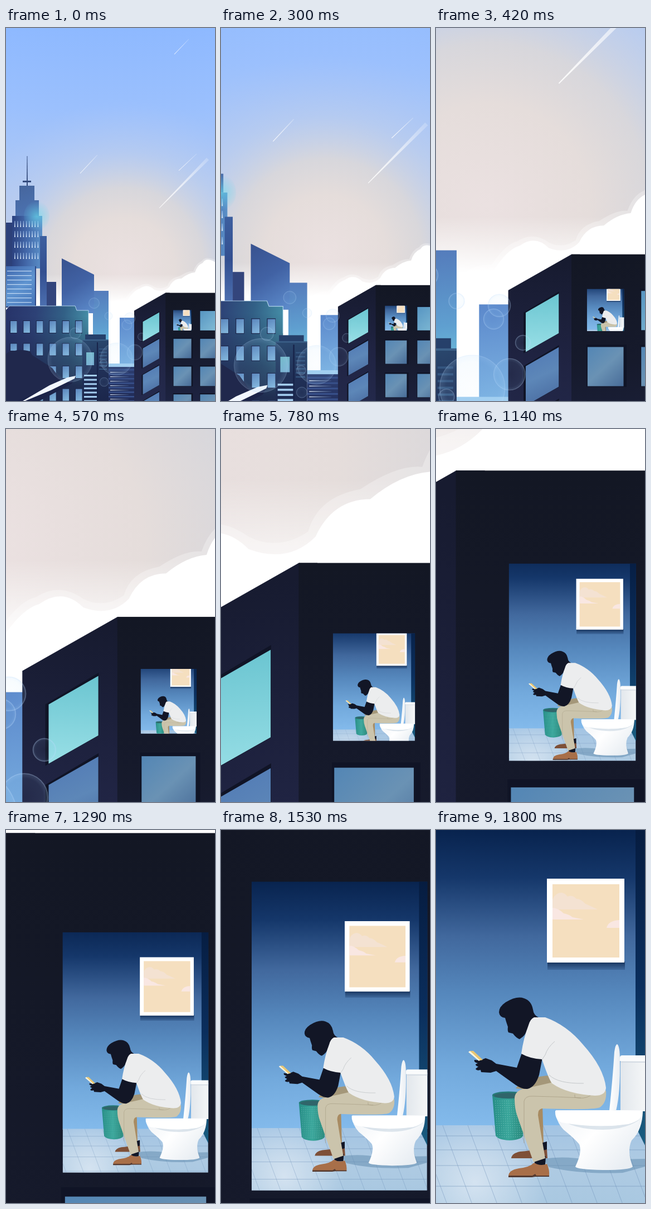
Recreate the animation shown at these times as an HTML page with a canvas. Size 375x667 px, loop 1.83 s.

```html
<!DOCTYPE html>
<html lang="en">
<head>
<meta charset="utf-8">
<title>City zoom</title>
<style>
html, body { margin: 0; width: 100%; height: 100%; overflow: hidden; background: #141829; }
canvas { display: block; width: 375px; height: 667px; }
</style>
</head>
<body>
<canvas id="stage" width="375" height="667"></canvas>
<script>
const ctx = document.getElementById('stage').getContext('2d');
const LOOP = 1830, HOLD = 300, STEP = 30, LAST = 51;
const START = 0.088, HOME_X = 300, HOME_Y = 494;

// Stage position of the room's corner, and the visible part of the room, by step.
const leftKeys = [[0, HOME_X], [42, 55], [LAST, 0]];
const topKeys = [[0, HOME_Y], [42, 90], [LAST, 0]];
const openTopKeys = [[0, 118], [10, 117], [24, 62], [34, 23], [42, 3], [LAST, -3]];
const openBottomKeys = [[0, 533], [10, 551], [24, 607], [34, 640], [42, 661], [LAST, 670]];

function at(keys, k) {
  let i = 1;
  while (i < keys.length - 1 && k > keys[i][0]) i++;
  const [a, u] = keys[i - 1], [b, v] = keys[i];
  return u + (v - u) * (k - a) / (b - a);
}

function shade(g, colors) {
  colors.forEach((c, i) => Array.isArray(c)
    ? g.addColorStop(c[0], c[1])
    : g.addColorStop(i / (colors.length - 1), c));
  return g;
}
const linear = (x0, y0, x1, y1, ...colors) => shade(ctx.createLinearGradient(x0, y0, x1, y1), colors);
const radial = (x, y, r, ...colors) => shade(ctx.createRadialGradient(x, y, 0, x, y, r), colors);

function rect(x0, y0, x1, y1, fill) {
  ctx.fillStyle = fill;
  ctx.fillRect(x0, y0, x1 - x0, y1 - y0);
}
function poly(fill, ...p) {
  ctx.beginPath();
  for (let i = 0; i < p.length; i += 2) ctx.lineTo(p[i], p[i + 1]);
  ctx.closePath();
  ctx.fillStyle = fill;
  ctx.fill();
}
function path(fill, d) {
  ctx.fillStyle = fill;
  ctx.fill(new Path2D(d));
}
function stroke(color, width, d) {
  ctx.strokeStyle = color;
  ctx.lineWidth = width;
  ctx.stroke(new Path2D(d));
}
function ellipse(x, y, rx, ry, fill) {
  ctx.beginPath();
  ctx.ellipse(x, y, rx, ry, 0, 0, 7);
  ctx.fillStyle = fill;
  ctx.fill();
}

function drawSky() {
  rect(0, 0, 375, 667, linear(0, 0, 0, 430, '#8eb9ff', '#9bc0fd', '#b0c9f3', '#bdcdea'));
  rect(0, 0, 375, 667, radial(212, 430, 300,
    [0, '#ebe1e1'], [0.3, '#e5dddb'], [0.48, 'rgba(222,217,216,.85)'],
    [0.7, 'rgba(200,210,232,.4)'], [1, 'rgba(180,200,245,0)']));
  rect(0, 440, 375, 667, linear(0, 440, 0, 490, 'rgba(255,255,255,0)', '#fff'));
  streak(302, 47, 328, 20, 1);
  streak(133, 260, 164, 227, 1.3);
  streak(310, 255, 342, 225, 1);
  streak(275, 322, 362, 234, 6);
  path('rgba(255,255,255,.28)', 'M180 500Q195 482 215 483Q228 464 238 462Q252 453 266 463Q278 469 290 461Q294 447 311 444Q326 434 336 435Q341 421 351 417Q357 407 376 415V667H180Z');
  path('#fff', 'M180 510Q197 489 217 488Q229 469 240 466Q254 456 266 468Q282 474 293 463Q300 448 315 448Q327 438 339 437Q343 424 353 420Q359 409 376 419V667H180Z');
}

function streak(x0, y0, x1, y1, w) {
  const h = w / 2 * 0.7;
  poly(linear(x0, y0, x1, y1, 'rgba(255,255,255,.9)', 'rgba(255,255,255,.6)', 'rgba(255,255,255,.2)'),
    x0 - 0.3, y0 - 0.3, x1 - h, y1 - h, x1 + h, y1 + h, x0 + 0.3, y0 + 0.3);
}

function drawTower() {
  rect(0, 348, 12, 500, '#2c4079');
  poly('#2d4475', 38.4, 229, 39, 283, 37, 283, 37.6, 229);
  rect(30, 273, 45, 276, '#334a7d');
  const tier = linear(10, 282, 70, 430, '#45649b', '#4e77b8', '#3e5fa2');
  rect(24, 282, 51, 308, tier);
  rect(17, 308, 59, 336, tier);
  rect(11, 336, 65, 430, linear(11, 0, 65, 0, '#2c4280', '#446aab', '#5b90c8'));
  rect(61, 372, 73, 500, linear(0, 372, 0, 500, '#3d5f9f', '#334f90', '#4d70b0'));
  for (const y of [345, 363, 382, 402]) {
    for (let x = 15; x < 60; x += 5.2) {
      rect(x, y, x + 1.6, y + 11, linear(0, y, 0, y + 11, 'rgba(180,215,255,.4)', '#e7f2ff'));
    }
  }
  ellipse(55, 336, 23, 27, radial(55, 336, 27, 'rgba(102,225,238,.6)', 'rgba(102,210,238,0)'));
  rect(0, 426, 53, 498, linear(0, 426, 53, 498, '#3f66ac', '#5f94d0', '#4674b8'));
  rect(52, 426, 54, 498, '#304a88');
  for (let y = 434; y < 494; y += 8) rect(2, y, 46, y + 1.3, 'rgba(225,240,255,.75)');
}

function drawCity() {
  drawTower();
  rect(73, 454, 90, 500, '#33457c');
  rect(156, 470, 184, 606, linear(156, 470, 172, 606, '#547bbb', '#5f9fd0', '#7bdbe2'));
  poly(linear(100, 412, 158, 505, '#38528f', '#4162a4', '#5c8aca'),
    100, 412, 158, 441, 158, 510, 100, 510);
  rect(204, 518, 232, 610, linear(204, 518, 220, 610, '#5b88cb', '#7fb6e4'));
  rect(182, 600, 231, 607, '#a3cff0');

  // low block on the left
  poly(linear(0, 520, 150, 545, '#27346a', '#2d4176', '#326086', '#4794ab'),
    0, 504, 6, 497, 124, 497, 127, 505, 148, 505, 148, 667, 0, 667);
  rect(0, 510, 148, 667, linear(0, 515, 0, 640, 'rgba(28,34,70,0)', 'rgba(27,33,69,.88)'));
  stroke('rgba(200,230,250,.8)', 1, 'M0 504L6 497H124L127 505H148V545');
  for (let y = 524; y < 667; y += 40.5) {
    for (let x = 8; x < 130; x += 23.4) {
      rect(x - 1, y - 1, x + 12, y + 22, '#1b2449');
      rect(x, y, x + 11.5, y + 21, linear(x, y, x + 11, y + 21, '#5b86bd', '#85b9de'));
    }
  }
  path('#20284c', 'M0 583L8 577H16Q25 574 43 578L47 585L83 608L102 634L40 667H0Z');
  poly('#1c2449', 125, 622, 118, 636, 60, 667, 20, 667);
  poly('#f2f7ff', 125, 622, 123, 627, 80, 648, 34, 667, 30, 667, 78, 639, 110, 625);

  // narrow block in the middle
  rect(137, 558, 184, 667, linear(137, 558, 160, 667, '#2b4a70', '#213158', '#1c274c'));
  rect(142, 548, 179, 559, '#26406a');
  rect(137, 557, 184, 559, '#3c6189');
  rect(144, 580, 158, 603, linear(144, 580, 158, 603, '#73bac8', '#78add2'));
  rect(163, 562, 165, 667, '#18244a');
  for (let y = 573; y < 610; y += 6) rect(167, y, 181, y + 2, '#34557f');
  for (let y = 620; y < 667; y += 7.6) rect(140, y, 163, y + 3, '#a4cdf0');

  // low block on the right
  rect(184, 606, 231, 667, linear(0, 606, 0, 667, '#2d3f72', '#202a55'));
  for (let y = 610; y < 667; y += 8) {
    rect(184, y, 231, y + 2.5, '#38508a');
    rect(187, y + 5, 220, y + 6.2, linear(187, 0, 220, 0, 'rgba(240,248,255,.9)', 'rgba(160,200,240,.1)'));
  }
}

// Coordinates are in room units, measured from the room's vanishing point.
function drawBlock() {
  poly(linear(0, -700, 0, 1420, '#171b30', '#202443', '#242a4d'),
    -1125, -412, -485, -774, -400, -774, -400, 1430, -1125, 1430);
  rect(-486, -774, 600, 1430, linear(0, -774, 0, 1400, '#131724', '#161a2c', '#1d2341'));
  for (let i = 0; i < 4; i++) {
    const y = -378 + 540 * i;
    poly('#101426', -970, y + 190, -612, y - 22, -612, y + 400, -970, y + 602);
    poly(i ? linear(-900, y, -650, y + 560, '#5079b5', '#5d87b8', '#486a9f') : linear(0, y, 0, y + 580, '#6bc5d1', '#98dfe6'),
      -948, y + 191, -614, y, -614, y + 399, -948, y + 588);
  }
  for (const [x0, x1] of [[-323, 41], [220, 590]]) {
    for (let i = 0; i < 4; i++) {
      if (x0 < 0 && !i) continue;
      const y = -405 + 565 * i;
      rect(x0 - 10, y - 24, x1 + 30, y + 402, '#101426');
      rect(x0, y, x1, y + 395, i
        ? linear(x0, y, x1, y + 395, '#5386b5', '#6a92b4', '#486c98')
        : linear(x0, y, x1, y + 395, '#5795c2', '#83bdd6'));
    }
  }
}

function drawBubbles() {
  const bubbles = [[115, 593, 40], [198, 592, 29], [158, 492, 9.5], [124, 546, 10], [231, 580, 14],
    [184, 515, 7], [222, 519, 10], [217, 531, 9], [243, 552, 6.7], [176, 633, 8], [175, 600, 7]];
  for (const [x, y, r] of bubbles) {
    ellipse(x, y, r, r, radial(x, y, r, [0, 'rgba(150,205,245,.03)'], [0.8, 'rgba(150,205,245,.07)'], [1, 'rgba(180,220,255,.18)']));
    ctx.strokeStyle = 'rgba(190,220,250,.28)';
    ctx.lineWidth = 0.6;
    ctx.stroke();
  }
}

function drawPicture() {
  rect(200, 235, 339, 250, linear(0, 235, 0, 250, 'rgba(7,29,65,.8)', 'rgba(20,50,95,.25)'));
  rect(199, 87, 338, 237, '#fff');
  rect(209, 97, 329, 228, '#f5dfbf');
  path('#f4e2d2', 'M209 142V124Q215 112 225 112Q232 113 236 119Q244 115 252 123Q260 123 268 132Q280 137 290 142Z');
  path('#f9e7e2', 'M209 160V139Q220 140 229 149Q239 151 245 156L265 160Z');
  path('#f9e7e2', 'M306 175Q309 162 329 161V175Z');
}

function drawFloor() {
  rect(0, 528, 375, 672, linear(0, 528, 0, 667, '#a3c4e3', '#afcbe3', '#a9c8e1'));
  rect(0, 528, 250, 672, radial(70, 630, 130, 'rgba(222,233,244,.8)', 'rgba(222,233,244,0)'));
  for (const y of [547, 572, 600, 637]) stroke('rgba(105,139,180,.65)', 0.8, `M0 ${y}H375`);
  for (let x = -33; x < 375; x += 45) stroke('rgba(105,139,180,.55)', 0.8, `M${x} 528L${x + 54} 672`);
  path('rgba(101,142,177,.55)', 'M192 588Q230 582 275 590L375 588V602L335 613Q260 616 203 603Z');
}

function drawToilet() {
  path(linear(331, 0, 375, 0, '#e2e7ec', '#f4f6f7'), 'M331 410H376V503H331Z');
  path('#fafbfc', 'M334 403H376V413H330V407Q330 403 334 403Z');
  path('#d5dce4', 'M331 414H376V416H331Z');
  path(linear(215, 500, 330, 608, '#eef2f6', '#ffffff', '#e9eef3'),
    'M215 501Q214 520 229 536Q250 553 257 562Q263 575 250 602Q252 607 300 608Q348 608 353 602Q342 574 351 555Q371 536 371 501Z');
  path('rgba(195,209,223,.55)', 'M217 513Q245 536 300 536Q345 535 369 515Q351 529 301 529Q250 529 217 513Z');
  path('#fff', 'M214 502Q213 518 225 523Q285 534 345 526Q371 519 371 502Z');
  path(linear(312, 0, 331, 0, '#ffffff', '#e8edf2'),
    'M311 502Q317 445 320 397Q322 383 325 383Q330 386 330 412Q331 470 323 502Z');
}

function drawBin() {
  path(linear(101, 0, 158, 0, '#268d86', '#3aa69b', '#278679'),
    'M101 474L107 546Q110 554 132 555Q152 554 156 547L160 474Z');
  for (let y = 484; y < 552; y += 4) {
    for (let x = 106 + (y - 484) / 16; x < 156; x += 4) rect(x, y, x + 1.2, y + 1.2, 'rgba(140,210,200,.65)');
  }
  ellipse(130, 474, 29, 6.5, '#267a78');
  ellipse(130, 475, 26, 5, '#30656a');
}

function drawMan() {
  const ink = '#121626';
  // far leg and shoe
  path('#a49779', 'M143 462Q155 444 200 439L222 456L190 468Z');
  path('#a88b62', 'M181 492L191 490L193 563H185Z');
  path(ink, 'M188 560L199 557V574H187Z');
  path('#7e5038', 'M135 587Q136 578 151 575Q170 574 178 570Q192 575 199 571L200 587Z');
  // near leg
  path(ink, 'M175 586L197 583L196 599H178Z');
  path('#a86f49', 'M130 619Q130 608 149 605Q168 603 176 595Q187 602 199 597Q204 607 203 619H180L178 616L173 619Z');
  path('#543a31', 'M130 618H173L178 615L180 618H203V620H178L172 621H130Z');
  path('#cbc4ac', 'M141 482Q140 466 160 462Q185 457 210 451L262 468L305 466Q307 487 294 496Q283 501 190 498Q183 499 183 510Q189 548 196 587L175 594Q159 549 146 512Q141 498 141 482Z');
  stroke('#a99f86', 0.8, 'M158 560V485Q160 475 174 476Q220 477 260 479M249 473V478Q265 482 277 475');
  // head
  path(ink, 'M113 326Q113 316 125 308Q145 296 158 301Q171 305 174 321Q175 331 184 335L163 358Q161 367 150 374Q144 372 138 364L130 362Q128 359 129 352L126 343L124 336Q114 335 113 326Z');
  // arm and phone
  path(ink, 'M155 396L191 407L185 438Q178 460 164 463Q155 464 143 456L108 431L98 434L81 433L80 429Q73 431 71 427L76 423Q71 422 71 419L75 417Q67 415 69 411L79 412L89 408L100 412L108 418L145 425Z');
  poly('#fff6dd', 58, 397, 61, 395, 80, 411, 77, 413);
  poly('#eac773', 61, 395, 67, 395, 84, 411, 79, 412);
  // shirt
  path('#ecedee', 'M176 335H196Q235 349 264 384Q301 425 305 461Q304 475 285 475Q235 472 208 453Q203 447 190 410Q169 409 153 400Q157 372 166 349Q169 338 176 335Z');
  stroke('#bfc3c6', 0.9, 'M213 378Q200 389 196 402L190 411M203 438Q219 454 265 453');
}

function drawRoom() {
  rect(-1, -5, 376, 530, linear(0, 0, 0, 528,
    [0, '#08234e'], [0.16, '#15376a'], [0.36, '#41689d'], [0.55, '#5587bc'], [0.8, '#72a9dc'], [1, '#83baeb']));
  drawFloor();
  poly(linear(0, 0, 0, 560, '#061c40', '#0a2e5d', '#195c80'), 358, -5, 376, -5, 376, 566, 358, 530);
  drawPicture();
  drawBin();
  drawToilet();
  drawMan();
}

function render(ms) {
  const t = ms % LOOP;
  const k = t < HOLD ? 0 : Math.min(LAST, Math.floor((t - HOLD) / STEP) + 1);
  const scale = START + (1 - START) * k / LAST;
  const left = at(leftKeys, k), top = at(topKeys, k);

  // Draws with (x, y) of the layer's own space placed on the room's corner.
  function layer(zoom, x, y, draw) {
    ctx.save();
    ctx.translate(left, top);
    ctx.scale(zoom, zoom);
    ctx.translate(-x, -y);
    draw();
    ctx.restore();
  }

  layer(scale / START, HOME_X, HOME_Y, drawSky);
  layer(scale / START, HOME_X, HOME_Y, drawCity);
  layer(scale, -329, -542, drawBlock);
  layer(scale / START, HOME_X, HOME_Y, drawBubbles);
  layer(scale, 0, 0, () => {
    const y0 = at(openTopKeys, k), y1 = at(openBottomKeys, k);
    ctx.beginPath();
    ctx.rect(0, y0, 376, y1 - y0);
    ctx.clip();
    drawRoom();
  });
}

const begin = performance.now();
function tick() {
  render(performance.now() - begin);
  requestAnimationFrame(tick);
}
tick();
</script>
</body>
</html>
```
